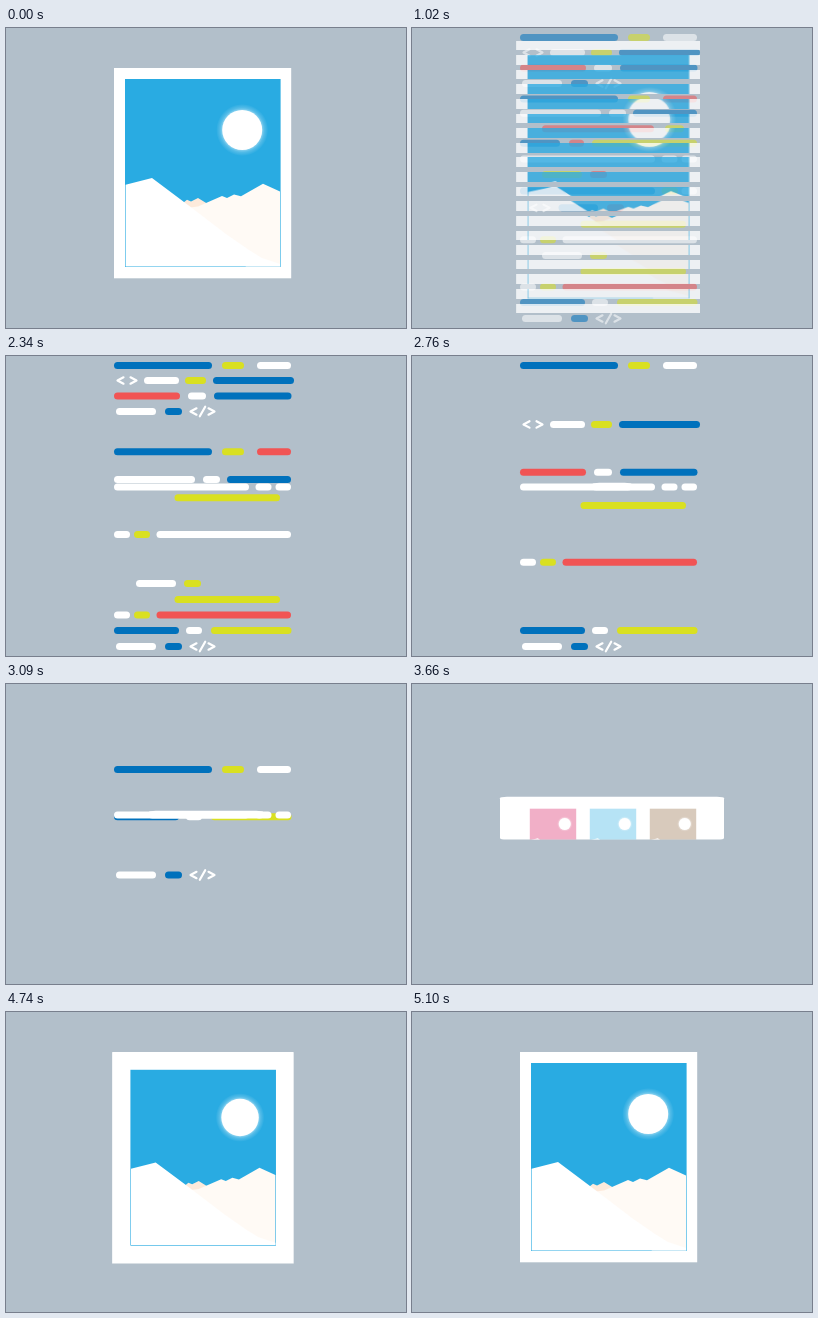
Recreate the animation shown at these times as an HTML page with a canvas. Size 400 by 300 pixels, loop 5.4 s.

```html
<!DOCTYPE html>
<html lang="en">
<head>
<meta charset="utf-8">
<title>Picture, code, gallery</title>
<style>
html, body { margin: 0; width: 100%; height: 100%; overflow: hidden; background: #b2bfca; }
canvas { display: block; width: 400px; height: 300px; }
</style>
</head>
<body>
<canvas id="stage"></canvas>
<script>
const LOOP = 5400, W = 400, H = 300;
const DPR = window.devicePixelRatio || 1;
const COLORS = { b: '#0071bc', y: '#d9e021', r: '#f15454', w: '#ffffff' };

// Pills are colour + left-right; "<" is a tag, "/" a closing tag, each with its left edge.
const ROWS = [
  [9.5, 'b108-206 y216-238 w251-285'],
  [24.5, '<111 w138-173 y179-200 b207-288'],
  [40, 'r108-174 w182-200 b208-285.5'],
  [55.5, 'w110-150 b159-176 /184'],
  [71, 'b108-206 y216-238 r251-285'],
  [85.2, 'w108-189 w197-214 b221-285'],
  [100.7, 'r130-242 y253-272'],
  [115.2, 'b108-148 r157-172 y180-285'],
  [131.1, 'w108-243 w249.5-265.5 w269.5-285'],
  [146.6, 'y130-170 r178-195'],
  [163, 'b108-243 y249.5-266 w269.5-285'],
  [179.8, '<118 b146.5-186 r195-212'],
  [196.2, 'y168.5-274'],
  [211.8, 'w108-124 y128-144 w150.5-285'],
  [227.6, 'w130-170 y178-195'],
  [243.4, 'y168.5-274'],
  [259, 'w108-124 y128-144 r150.5-285'],
  [274.5, 'b108-173 w180-196 y205-285.5'],
  [290.5, 'w110-150 b159-176 /184']
].map(([y, text]) => ({ y, parts: text.split(' ').map(s => {
  const [x0, x1] = s.slice(1).split('-').map(Number);
  return { kind: s[0], x0, x1 };
}) }));
const MID = 8, MID_Y = ROWS[MID].y;

const SKIES = ['#f7931e', '#c69c6d', '#ff938c', '#d4145a', '#29abe2', '#8c6239', '#2e3192', '#d9e021', '#b3b3b3'];
const BLUE = SKIES[4];
const FRAME = { x: 108, y: 40, w: 177.2, h: 210.3 };
const GRID = { x: 88, y: 40.3, w: 224, h: 223.4 };
const PIC = { x: 119, y: 51, w: 155.6, h: 188 };
const CARD = { w: 46.4, h: 56.1 };

const clamp = v => Math.max(0, Math.min(1, v));
const ramp = (t, a, b) => clamp((t - a) / (b - a));
const lerp = (a, b, p) => a + (b - a) * p;
const inOutQuad = p => p < 0.5 ? 2 * p * p : 1 - 2 * (1 - p) ** 2;
const outCubic = p => 1 - (1 - p) ** 3;
const mixBox = (a, b, p) => ({
  x: lerp(a.x, b.x, p), y: lerp(a.y, b.y, p), w: lerp(a.w, b.w, p), h: lerp(a.h, b.h, p)
});

function setup(canvas) {
  canvas.width = W * DPR;
  canvas.height = H * DPR;
  const c = canvas.getContext('2d');
  c.scale(DPR, DPR);
  return c;
}

function polygon(c, color, points) {
  c.fillStyle = color;
  c.beginPath();
  points.forEach(([x, y]) => c.lineTo(x, y));
  c.fill();
}

// Landscape, drawn in the coordinates of the large picture and scaled into the box.
function landscape(c, box, sky, alpha = 1) {
  c.save();
  c.translate(box.x, box.y);
  c.scale(box.w / PIC.w, box.h / PIC.h);
  c.translate(-PIC.x, -PIC.y);
  c.globalAlpha *= alpha;
  c.fillStyle = sky;
  c.fillRect(PIC.x, PIC.y, PIC.w, PIC.h);
  c.globalAlpha /= alpha || 1;

  const glow = c.createRadialGradient(236.2, 102, 19, 236.2, 102, 26);
  glow.addColorStop(0, 'rgba(255,255,255,.55)');
  glow.addColorStop(0.45, 'rgba(255,255,255,.2)');
  glow.addColorStop(1, 'rgba(255,255,255,0)');
  c.fillStyle = glow;
  c.beginPath();
  c.arc(236.2, 102, 26, 0, 7);
  c.fill();
  c.fillStyle = '#fff';
  c.beginPath();
  c.arc(236.2, 102, 20, 0, 7);
  c.fill();

  const right = PIC.x + PIC.w - 0.6, bottom = PIC.y + PIC.h - 0.6, left = PIC.x + 0.6;
  polygon(c, '#fdeadb', [[177, 175], [181, 171.8], [185, 173.5], [192, 170], [201, 175.5], [186, 182]]);
  polygon(c, '#fffaf5', [[184, 179.5], [192, 178.5], [200, 175], [216, 168], [221, 170], [228, 166.5],
    [235, 168.3], [257, 155.8], [right, 163.5], [right, bottom], [240, bottom]]);
  polygon(c, '#fff', [[left, 156.8], [146, 150], [178, 174], [186, 180], [220, 206], [243, 222],
    [256, 230], [right, 236], [right, bottom], [left, bottom]]);
  c.restore();
}

function panelPath(c, b, rx, ry) {
  const r = b.x + b.w, d = b.y + b.h;
  c.beginPath();
  c.moveTo(b.x + rx, b.y);
  c.lineTo(r - rx, b.y);
  c.quadraticCurveTo(r, b.y, r, b.y + ry);
  c.lineTo(r, d - ry);
  c.quadraticCurveTo(r, d, r - rx, d);
  c.lineTo(b.x + rx, d);
  c.quadraticCurveTo(b.x, d, b.x, d - ry);
  c.lineTo(b.x, b.y + ry);
  c.quadraticCurveTo(b.x, b.y, b.x + rx, b.y);
  c.closePath();
}

function framedPicture(c) {
  c.fillStyle = '#fff';
  c.fillRect(FRAME.x, FRAME.y, FRAME.w, FRAME.h);
  landscape(c, PIC, BLUE);
}

const ctx = setup(document.getElementById('stage'));
const sheet = document.createElement('canvas');
framedPicture(setup(sheet));

function line(...points) {
  ctx.beginPath();
  points.forEach(([x, y]) => ctx.lineTo(x, y));
  ctx.stroke();
}

function chevron(x, y, dir) {
  line([x + 3 * dir, y - 3.2], [x - 3 * dir, y], [x + 3 * dir, y + 3.2]);
}

function drawRow(row, y) {
  ctx.lineCap = ctx.lineJoin = 'round';
  for (const { kind, x0, x1 } of row.parts) {
    ctx.strokeStyle = COLORS[kind] || '#fff';
    if (kind === '<' || kind === '/') {
      const closing = kind === '/';
      ctx.lineWidth = 2.2;
      chevron(x0 + 3.5, y, 1);
      chevron(x0 + (closing ? 21.5 : 16.5), y, -1);
      if (closing) line([x0 + 9.8, y + 4.8], [x0 + 15.2, y - 4.8]);
    } else {
      ctx.lineWidth = 7;
      line([x0 + 3.5, y], [x1 - 3.5, y]);
    }
  }
}

function drawStrips(t) {
  const p = inOutQuad(ramp(t, 660, 1200));
  const n = ROWS.length, slice = FRAME.h / n;
  const w = lerp(FRAME.w, 186, p), h = lerp(slice, 9.3, p);
  ctx.globalAlpha = 1 - ramp(t, 960, 1220);
  for (let i = 0; i < n; i++) {
    const from = FRAME.y + slice * i;
    const y = lerp(from + slice / 2, lerp(9.5, 290.5, i / (n - 1)), p) - h / 2;
    ctx.drawImage(sheet, FRAME.x * DPR, from * DPR, FRAME.w * DPR, slice * DPR,
      lerp(FRAME.x, 103, p), y, w, h);
  }
  ctx.globalAlpha = 1;
}

// Rows leave in pairs, from the middle outwards.
function leaveTime(i) {
  if (i === 9) return 1785;
  if (i === 0 || i === 18) return 2885;
  const step = i < MID ? MID - i : i - MID - 1;
  return 1785 + 140 * (step - 1);
}

function drawCode(t) {
  ctx.globalAlpha = ramp(t, 840, 1170);
  ROWS.forEach((row, i) => {
    if (i === MID) return;
    const start = leaveTime(i), p = ramp(t, start, start + 330);
    if (p < 1) drawRow(row, lerp(row.y, MID_Y, p));
  });
  if (t < 3570) drawRow(ROWS[MID], MID_Y);
  ctx.globalAlpha = 1;
}

function drawGallery(t) {
  const wide = ramp(t, 2590, 3570), tall = ramp(t, 3568, 4140);
  const zoom = outCubic(ramp(t, 4305, 5100));
  const strip = { x: 200 - 112 * wide, y: 126.8, w: 224 * wide, h: 7.6 };
  const box = mixBox(mixBox(strip, GRID, tall), FRAME, zoom);
  const round = 1 - zoom;
  ctx.save();
  panelPath(ctx, box, Math.min(7 * round, box.w / 2), 1.5 * round);
  ctx.fillStyle = '#fff';
  ctx.fill();
  if (t > 3570) {
    ctx.clip();
    const shown = ramp(t, 3570, 3840), others = 1 - ramp(t, 4305, 4560);
    const cell = i => ({ x: 117.8 + 60 * (i % 3), y: 55.7 + 69 * Math.floor(i / 3), ...CARD });
    SKIES.forEach((sky, i) => {
      if (i === 4 || others === 0) return;
      ctx.globalAlpha = others;
      landscape(ctx, cell(i), sky, shown);
    });
    ctx.globalAlpha = 1;
    landscape(ctx, mixBox(cell(4), PIC, zoom), BLUE, shown);
  }
  ctx.restore();
}

function draw(t) {
  ctx.fillStyle = '#b2bfca';
  ctx.fillRect(0, 0, W, H);
  if (t < 660 || t >= 5100) return framedPicture(ctx);
  if (t > 840 && t < 3570) drawCode(t);
  if (t < 1220) drawStrips(t);
  if (t > 2590) drawGallery(t);
}

const begin = performance.now();
function tick() {
  draw((performance.now() - begin) % LOOP);
  requestAnimationFrame(tick);
}
tick();
</script>
</body>
</html>
```
